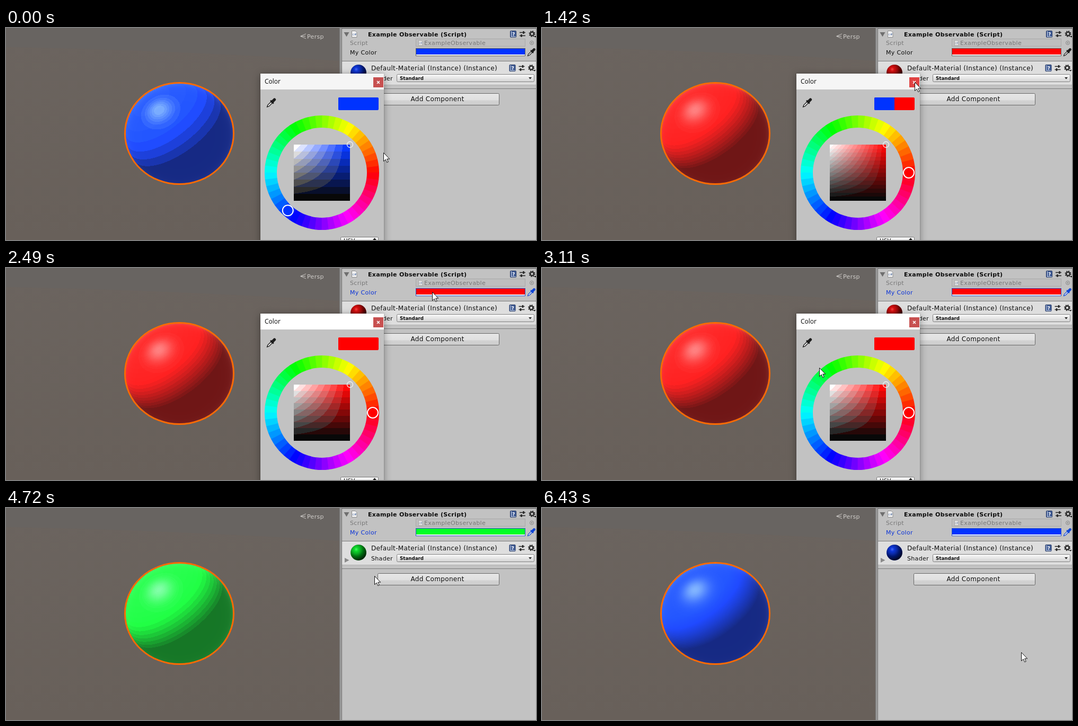
Recreate the animation shown at these times as an HTML page with a canvas. Size 1000x400 px, loop 6510 ms.

```html
<!DOCTYPE html>
<html lang="en">
<head>
<meta charset="utf-8">
<title>Observable colour</title>
<style>
  html, body { margin: 0; width: 100%; height: 100%; overflow: hidden; }
  body { background: #69615b; }
  #stage { position: relative; width: 1000px; height: 400px; overflow: hidden; }
  #stage > *, #picker > * { position: absolute; }
  svg { display: block; overflow: visible; left: 0; top: 0; }
  text { font: 11px "DejaVu Sans", sans-serif; letter-spacing: .33px; fill: #0c0c0c; }
  .big { font-size: 12px; }
  .bold { font-weight: bold; }
  .dim { fill: #777; }
  #ball { left: 226px; top: 105px; border-radius: 50%; box-shadow: 0 0 0 3px #ff6a00; }
  #picker {
    left: 480px; top: 86px; width: 233px; height: 330px; background: #c2c2c2;
    box-shadow: 0 2px 13px rgba(0, 0, 0, .38), 0 0 1px rgba(0, 0, 0, .5);
  }
  #square { left: 63px; top: 134px; }
  #label.focus { fill: #0b33d8; }
  .dropper { color: #1c1c1c; }
  .dropper.focus { color: #0f45d6; }
  #field { stroke: #606060; }
  #field.focus { stroke: #2c50c4; }
</style>
</head>
<body>
<div id="stage">
  <svg width="1000" height="400">
    <defs>
      <linearGradient id="ground" x2="0" y2="1">
        <stop offset="0" stop-color="#6b645f"/><stop offset="1" stop-color="#68605a"/>
      </linearGradient>
      <linearGradient id="button" x2="0" y2="1">
        <stop offset="0" stop-color="#e6e6e6"/><stop offset=".58" stop-color="#dfdfdf"/>
        <stop offset=".6" stop-color="#d2d2d2"/><stop offset="1" stop-color="#cdcdcd"/>
      </linearGradient>
      <linearGradient id="menu" x2="0" y2="1">
        <stop offset="0" stop-color="#fafafa"/><stop offset="1" stop-color="#d2d2d2"/>
      </linearGradient>
      <radialGradient id="shade" cx=".36" cy=".3" r=".72">
        <stop offset="0" stop-color="#fff" stop-opacity=".28"/>
        <stop offset=".2" stop-color="#333" stop-opacity=".22"/>
        <stop offset=".6" stop-color="#000" stop-opacity=".55"/>
        <stop offset="1" stop-color="#000" stop-opacity=".88"/>
      </radialGradient>
      <g id="doc">
        <path d="M.5.5H7L10 3.5V12.5H.5Z" fill="#f2f2f2" stroke="#8c8c8c"/>
        <text x="1.5" y="9" style="font-size:6px;letter-spacing:0;fill:#45659c">c#</text>
      </g>
      <g id="tools">
        <rect x=".5" y=".5" width="11" height="12" rx="1" fill="#425d96" stroke="#1d3260"/>
        <path d="M2.5 1V12M2 11.500H11" stroke="#d3ddf0"/>
        <text class="bold" x="4" y="9.500" style="font-size:9px;letter-spacing:0;fill:#fff">?</text>
        <path d="M18 3.5H29M18 9.5H29" stroke="#222" stroke-width="1.4"/>
        <path d="M25.5 1V6M21.5 7V12" stroke="#222" stroke-width="2.4"/>
        <circle cx="41.5" cy="6" r="3.4" fill="none" stroke="#2a2a2a" stroke-width="2.4"/>
        <circle cx="41.5" cy="6" r="5" fill="none" stroke="#2a2a2a" stroke-width="2" stroke-dasharray="2 1.93"/>
        <path d="M45 10H50L47.5 13Z" fill="#222"/>
      </g>
      <g id="dropper">
        <path d="M1.5 15.5L2.5 12.5 9 6 11 8 4.500 14.500Z" fill="#f4f4f4" stroke="currentColor" stroke-width="1.2"/>
        <path d="M7 5L12 10" stroke="currentColor" stroke-width="2.4"/>
        <path d="M10 7L13.500 3.500" stroke="currentColor" stroke-width="4.600" stroke-linecap="round"/>
      </g>
    </defs>

    <rect width="630" height="400" fill="url(#ground)"/>
    <path d="M0 0H630V62Q300 41 0 36Z" fill="#686461"/>
    <path d="M566 11L555.500 15.500 566 20M556 15.500H565" fill="none" stroke="#c9c6c3"/>
    <text x="568" y="20" style="fill:#d0cdca">Persp</text>

    <rect x="629" width="371" height="400" fill="#c2c2c2"/>
    <rect x="629" width="2" height="400" fill="#858585"/>
    <rect x="631" width="2" height="400" fill="#a2a2a2"/>
    <rect x="633" width="1" height="400" fill="#6e6e6e"/>
    <rect x="634" width="366" height="1.500" fill="#747474"/>

    <path d="M637.500 8H647.500L642.500 16.500Z" fill="#6f6f6f"/>
    <use href="#doc" x="652" y="5"/>
    <text class="bold" x="683" y="16">Example Observable (Script)</text>
    <use href="#tools" x="951" y="5"/>
    <text class="dim" x="649" y="32">Script</text>
    <rect x="773.500" y="20.500" width="206" height="14" fill="#bebebe" stroke="#a9a9a9"/>
    <use href="#doc" transform="translate(778 23) scale(.8)" opacity=".65"/>
    <text class="dim" x="789" y="32">ExampleObservable</text>
    <circle cx="992" cy="28" r="3.500" fill="none" stroke="#858585"/>
    <circle cx="992" cy="28" r="1.200" fill="#858585"/>
    <text id="label" x="649" y="50">My Color</text>
    <rect id="field" x="773.500" y="38.500" width="206" height="14" fill="#fff"/>
    <rect id="bar" x="774" y="39" width="205" height="11"/>
    <use class="dropper" id="pick" href="#dropper" x="983" y="37"/>

    <rect x="634" y="62" width="366" height="46" fill="#dedede"/>
    <path d="M634 62.500H1000M634 114.500H1000" stroke="#7c7c7c"/>
    <path d="M634 107.500H1000" stroke="#b0b0b0"/>
    <circle id="icon" cx="665" cy="84" r="14.800"/>
    <circle cx="665" cy="84" r="14.900" fill="url(#shade)"/>
    <path d="M639 94V103L647.500 98.500Z" fill="#8a8a8a"/>
    <text class="big" x="689" y="80">Default-Material (Instance) (Instance)</text>
    <use href="#tools" x="949.500" y="69"/>
    <text x="689" y="99">Shader</text>
    <rect x="737.500" y="87.500" width="259" height="14" rx="2" fill="url(#menu)" stroke="#828282"/>
    <text class="bold" x="743" y="98" style="font-size:8.700px;letter-spacing:0">Standard</text>
    <path d="M986 93H992L989 96.500Z" fill="#222"/>
    <rect x="701.500" y="123.500" width="229" height="22" rx="2" fill="url(#button)" stroke="#686868"/>
    <text class="big" x="763.500" y="138">Add Component</text>
  </svg>

  <canvas id="ball" width="202" height="188"></canvas>

  <div id="picker">
    <canvas id="square" width="106" height="106"></canvas>
    <svg width="233" height="314">
      <rect id="titlebar" width="233" height="30"/>
      <text x="8" y="19" style="font:12px 'Open Sans',sans-serif;letter-spacing:0">Color</text>
      <rect id="close" x="213" y="7" width="19" height="19"/>
      <path d="M220 14L225 19M225 14L220 19" stroke="#fff" stroke-width="1.600"/>
      <use class="dropper" href="#dropper" transform="translate(11 45) scale(1.150)"/>
      <rect id="now" x="147" y="45" width="76" height="24" rx="2"/>
      <path id="before" d="M149 45H185V69H149Q147 69 147 67V47Q147 45 149 45Z"/>
      <g id="ring" fill="none" stroke-width="23"></g>
      <circle id="hue" r="10" stroke="#fff" stroke-width="2"/>
      <circle id="spot" cx="169" cy="134" r="5.500" fill="none" stroke-width="1.300"/>
      <rect x="151.500" y="308.500" width="71" height="16" rx="2" fill="url(#menu)" stroke="#777"/>
      <text x="157" y="319" style="font-size:10px">HSV</text>
      <path d="M212 314H219L215.500 310Z" fill="#222"/>
    </svg>
  </div>

  <svg id="cursor" width="13" height="20">
    <path d="M.5.5V16.500L4.200 13.100 6.700 18.600 9.200 17.500 6.700 12.100H11.700Z" fill="#fff" stroke="#111"/>
  </svg>
</div>

<script>
const LOOP = 6510;
const $ = id => document.getElementById(id);
const BLUE = { rgb: [0, 51, 255], hue: 228 };
const RED = { rgb: [255, 0, 0], hue: 0 };
const GREEN = { rgb: [0, 255, 38], hue: 129 };
const AMBIENT = [.35, .38, .43];

// from time, colour, shading levels on the ball
const paints = [
  [0, BLUE, 6], [640, RED, 16], [3410, GREEN, 13],
  [5350, RED, 20], [5420, RED, 64], [6050, BLUE, 64]
];
// open, close, title bar, colour levels in the square before and after a pick
const sessions = [
  { from: 0, to: 1570, bar: '#f5f5f5', old: BLUE, pick: 640, levels: [8, 14] },
  { from: 2490, to: 4490, bar: '#fff', old: RED, pick: 3410, levels: [9, 15] }
];
// first step, last step, step count, destination
const moves = [
  [80, 230, 3, 686, 273], [400, 470, 2, 690, 273],
  [640, 870, 4, 704, 193], [940, 1170, 4, 706, 90],
  [1340, 1420, 2, 703, 102], [1570, 1880, 5, 775, 63],
  [1950, 2180, 4, 796, 51], [2260, 2340, 2, 804, 45],
  [2720, 3110, 6, 523, 188], [3180, 3340, 3, 523, 197],
  [3410, 3570, 3, 536, 199], [3720, 4030, 5, 694, 103],
  [4180, 4340, 3, 700, 106], [4720, 5100, 6, 672, 236],
  [6280, 6430, 3, 904, 272]
];

const css = rgb => `rgb(${rgb})`;
const within = (t, a, b) => t >= a && t < b;

function cursorAt(t) {
  let x = 712, y = 235;
  for (const [from, to, steps, tx, ty] of moves) {
    if (t < from) break;
    const gap = (to - from) / (steps - 1);
    const done = Math.min(steps, Math.floor((t - from) / gap + .01) + 1);
    const k = done / steps;
    x += (tx - x) * k;
    y += (ty - y) * k;
  }
  return [Math.round(x), Math.round(y)];
}

// Runs a per-pixel rule over a canvas; u and v go from 0 to 1.
function fill(canvas, rule) {
  const { width: w, height: h } = canvas;
  const g = canvas.getContext('2d');
  const img = g.createImageData(w, h);
  for (let j = 0, p = 0; j < h; j++) {
    for (let i = 0; i < w; i++, p += 4) {
      img.data.set(rule((i + .5) / w, (j + .5) / h), p);
      img.data[p + 3] = 255;
    }
  }
  g.putImageData(img, 0, 0);
}

function paintBall(rgb, levels) {
  const step = v => Math.round(v * levels) / levels;
  fill($('ball'), (u, v) => {
    let x = u * 2 - 1, y = 1 - v * 2;
    const r = Math.hypot(x, y);
    if (r > 1) { x /= r; y /= r; }
    const z = Math.sqrt(Math.max(0, 1 - x * x - y * y));
    const light = step(Math.max(0, -.57 * x + .7 * y + .44 * z));
    const gloss = step(Math.pow(Math.max(0, -.38 * x + .47 * y + .8 * z), 30));
    const rim = Math.pow(1 - z, 4) * (.6 + .4 * y);
    const white = 22 + 20 * light + 82 * gloss + 45 * rim;
    return rgb.map((c, i) => c * Math.min(1, AMBIENT[i] + .95 * light) + white);
  });
}

function paintSquare(rgb, levels) {
  const step = v => Math.min(1, Math.floor(v * levels) / (levels - 1));
  fill($('square'), (u, v) => {
    const high = step(1 - v), low = step((1 - v) * (1 - u));
    return rgb.map(c => 8 + 247 * (low + (high - low) * c / 255));
  });
}

// Repaints only when the arguments differ from the last call.
function cached(paint) {
  let last;
  return (rgb, levels) => {
    const key = rgb + '/' + levels;
    if (key !== last) paint(rgb, levels);
    last = key;
  };
}
const ball = cached(paintBall), square = cached(paintSquare);

function polar(deg, r) {
  const a = deg * Math.PI / 180;
  return [116 + r * Math.cos(a), 187 - r * Math.sin(a)];
}

function buildRing(count) {
  const size = 360 / count;
  for (let i = 0; i < count; i++) {
    const arc = document.createElementNS('http://www.w3.org/2000/svg', 'path');
    const a = polar(i * size - .2, 96.5), b = polar((i + 1) * size + .2, 96.5);
    arc.setAttribute('d', `M${a}A96.5 96.5 0 0 0 ${b}`);
    arc.setAttribute('stroke', `hsl(${(i + .5) * size} 100% 50%)`);
    $('ring').append(arc);
  }
}

function draw(t) {
  const [, color, levels] = paints.filter(p => p[0] <= t).pop();
  const main = css(color.rgb);
  ball(color.rgb, levels);
  for (const id of ['bar', 'icon', 'now', 'hue']) $(id).style.fill = main;

  const focus = within(t, 1570, 3410) || t >= 4720;
  for (const id of ['label', 'field', 'pick']) $(id).classList.toggle('focus', focus);

  const open = sessions.find(s => within(t, s.from, s.to));
  $('picker').style.display = open ? 'block' : 'none';
  if (open) {
    square(color.rgb, open.levels[t < open.pick ? 0 : 1]);
    const [hx, hy] = polar(color.hue, 96);
    $('hue').setAttribute('cx', hx);
    $('hue').setAttribute('cy', hy);
    $('before').style.fill = css(open.old.rgb);
    $('titlebar').style.fill = open.bar;
    $('spot').style.stroke = color === GREEN ? '#111' : '#f4f4f4';
    const hover = within(t, 1340, 1570) || within(t, 4030, 4490);
    $('close').style.fill = hover ? '#e04343' : '#c75050';
  }

  const [x, y] = cursorAt(t);
  $('cursor').style.transform = `translate(${x}px, ${y}px)`;
}

buildRing(52);
const start = performance.now();
function tick() {
  draw((performance.now() - start) % LOOP);
  requestAnimationFrame(tick);
}
tick();
</script>
</body>
</html>
```
